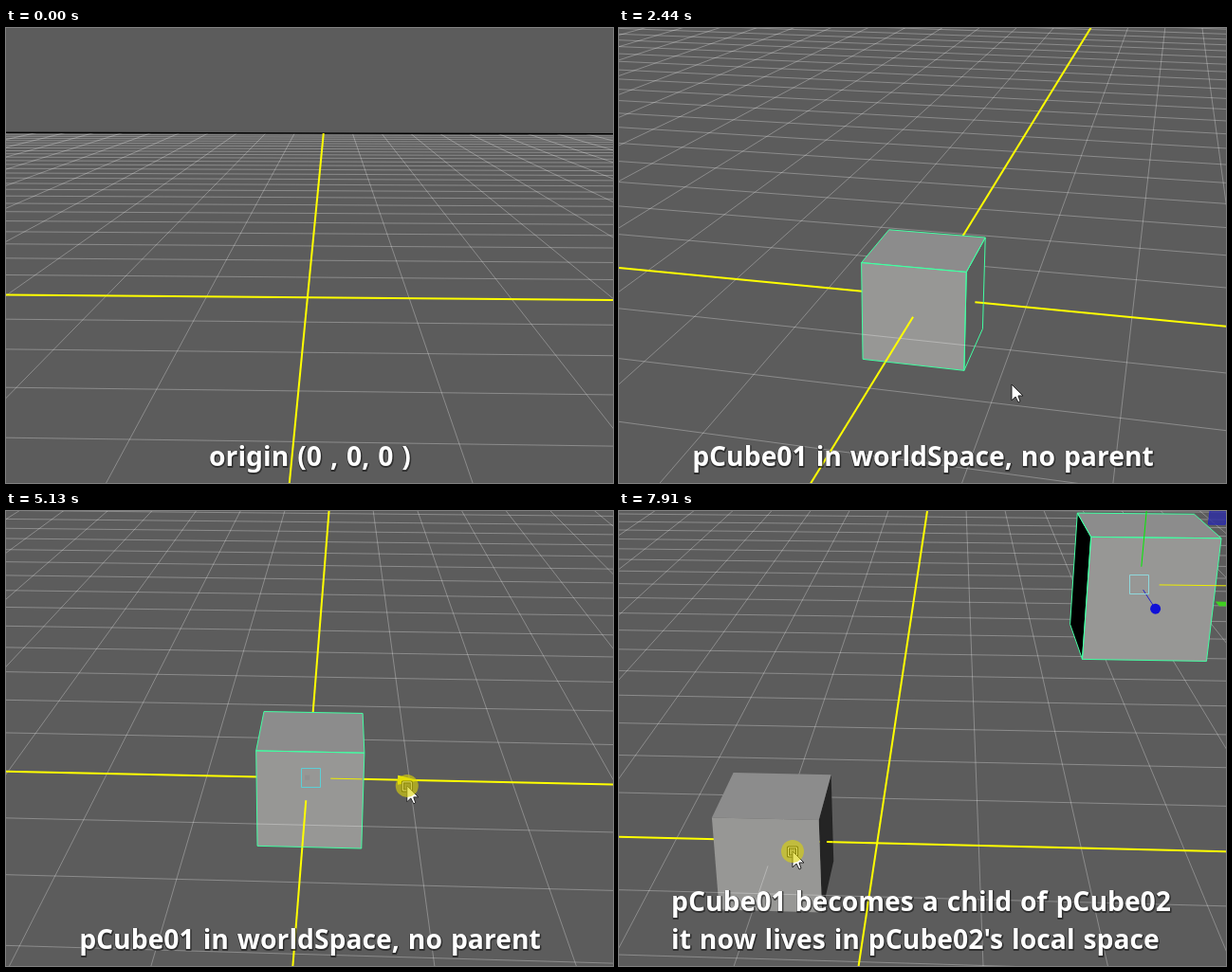
An HTML page with a canvas that plays this animation: 640 px wide and 480 px high, repeating every 8 s.

```html
<!DOCTYPE html>
<html lang="en">
<head>
<meta charset="utf-8">
<title>Object space</title>
<style>
  html, body { margin: 0; width: 100%; height: 100%; overflow: hidden; background: #5c5c5c; }
  canvas { display: block; }
</style>
</head>
<body>
<canvas id="stage" width="640" height="480"></canvas>
<script>
const ctx = document.getElementById('stage').getContext('2d');
const LOOP = 8000, FOCAL = 1090, DISTANCE = 10.2, CENTER_X = 298, CENTER_Y = 240, EXTENT = 26;

// Moments of the story, in ms
const TUMBLE = 170, TUMBLE_END = 1880, CUBE_SHOWN = 2060, TURN = 2440, TURN_END = 3110;
const GIZMO_SHOWN = 3140, DRAG = 3945, DRAG_END = 6600, RELEASE = 6850, SECOND_SCENE = 7680, CLICK = 7860;

const SECOND_CUBE = [2.262, 2.735, 0.396];
const SQUARE = [[-1, -1], [1, -1], [1, 1], [-1, 1]];

// Key points: time, then the values reached at that time
const TILT = [[TUMBLE, 2.25, 10.3], [1500, 16.5, 21.5], [TUMBLE_END, 14.3, 20], [TURN, 14.3, 20], [TURN_END, 2.9, 22.8]];
const SLIDE = [[3960, 0], [4730, 1.47], [5480, -1.13], [5820, 0.54], [6020, 0.53], [6410, -1]];
const POINTER = [[TUMBLE, 470, 230], [1500, 403, 399], [TUMBLE_END, 414, 376], [TURN, 414, 376], [3480, 390, 317], [3650, 390, 317], [DRAG, 418, 286]];
const LEAVE = [[RELEASE, 311, 292], [7030, 396, 312]];
const APPROACH = [[SECOND_SCENE, 215, 345], [CLICK, 183, 359]];

let cam;

const within = (t, from, to) => t >= from && t < to;
const mix = (a, b, k) => a + (b - a) * k;
const ease = k => k * k * (3 - 2 * k);

function track(keys, t) {
  const next = keys.findIndex(key => t < key[0]);
  if (next === 0) return keys[0].slice(1);
  if (next < 0) return keys[keys.length - 1].slice(1);
  const [t0, ...from] = keys[next - 1], [t1, ...to] = keys[next];
  return from.map((v, i) => mix(v, to[i], ease((t - t0) / (t1 - t0))));
}

function setCamera(t) {
  const [yaw, pitch] = track(TILT, t);
  const rad = Math.PI / 180, unit = DISTANCE / FOCAL;
  const [panX, panY] = t >= SECOND_SCENE ? [-46, 68.7] : [0, 0];
  const cp = Math.cos(pitch * rad);
  cam = {
    sy: Math.sin(yaw * rad), cy: Math.cos(yaw * rad),
    sp: Math.sin(pitch * rad), cp,
    right: (19 + 0.4 * yaw + panX) * unit,
    up: -(44.7 * cp + 0.15 * yaw + panY) * unit
  };
}

function view([x, y, z]) {
  const near = x * cam.sy + z * cam.cy;
  return [
    cam.right + x * cam.cy - z * cam.sy,
    cam.up + y * cam.cp - near * cam.sp,
    DISTANCE - near * cam.cp - y * cam.sp
  ];
}

const flatten = ([r, u, d]) => [CENTER_X + FOCAL * r / d, CENTER_Y - FOCAL * u / d];
const project = p => flatten(view(p));

function polygon(points, fill, stroke) {
  ctx.beginPath();
  points.forEach(p => ctx.lineTo(...p));
  ctx.closePath();
  if (fill) {
    ctx.fillStyle = fill;
    ctx.fill();
  }
  if (stroke) {
    ctx.strokeStyle = stroke;
    ctx.lineWidth = 1;
    ctx.stroke();
  }
}

function disc(x, y, radius, fill) {
  ctx.fillStyle = fill;
  ctx.beginPath();
  ctx.arc(x, y, radius, 0, 2 * Math.PI);
  ctx.fill();
}

function line(a, b, color, width = 1) {
  const NEAR = 0.5;
  let [p, q] = [view(a), view(b)].sort((m, n) => n[2] - m[2]);
  if (p[2] < NEAR) return;
  if (q[2] < NEAR) {
    const k = (p[2] - NEAR) / (p[2] - q[2]);
    q = p.map((v, i) => mix(v, q[i], k));
  }
  ctx.strokeStyle = color;
  ctx.lineWidth = width;
  ctx.beginPath();
  ctx.moveTo(...flatten(p));
  ctx.lineTo(...flatten(q));
  ctx.stroke();
}

function grid(x0 = -EXTENT, x1 = EXTENT, z0 = -EXTENT, z1 = EXTENT) {
  const pale = 'rgba(255,255,255,.29)';
  const alongZ = (x, ...style) => x >= x0 && x <= x1 && line([x, 0, z0], [x, 0, z1], ...style);
  const alongX = (z, ...style) => z >= z0 && z <= z1 && line([x0, 0, z], [x1, 0, z], ...style);
  for (let i = 1; i <= EXTENT; i++) {
    for (const n of [-i, i]) {
      alongZ(n, pale);
      alongX(n, pale);
    }
  }
  alongX(-EXTENT, '#000', 1.4);
  alongZ(0, '#ff0', 2);
  alongX(0, '#ff0', 2);
}

// Grid lines lying in front of a face are drawn again over it.
function gridBeyond(axis, side, center) {
  const edge = center[axis] + side / 2;
  if (axis === 2) grid(-EXTENT, EXTENT, edge);
  else if (side > 0) grid(edge);
  else grid(-EXTENT, edge);
}

function faceColor(axis, side) {
  if (axis === 2) return '#979795';
  if (axis === 1) return '#8c8c8c';
  if (side < 0) return '#000';
  const v = Math.round(22 + 280 * cam.sy);
  return `rgb(${v},${v},${v})`;
}

function facePoints(axis, side, center) {
  return SQUARE.map(([u, v]) => {
    const p = [...center];
    p[axis] += side / 2;
    p[(axis + 1) % 3] += side * u / 2;
    p[(axis + 2) % 3] += v / 2;
    return project(p);
  });
}

const facesViewer = ([a, b, c]) =>
  (b[0] - a[0]) * (c[1] - a[1]) < (b[1] - a[1]) * (c[0] - a[0]);

function cube(center, selected) {
  const faces = [];
  for (let axis = 0; axis < 3; axis++) {
    for (const side of [-1, 1]) {
      const points = facePoints(axis, side, center);
      if (facesViewer(points)) faces.push({ axis, side, points });
    }
  }
  faces.forEach(f => polygon(f.points, faceColor(f.axis, f.side)));
  if (selected) faces.forEach(f => polygon(f.points, null, '#43ffa3'));
  faces.filter(f => f.axis !== 1).forEach(f => {
    ctx.save();
    polygon(f.points);
    ctx.clip();
    gridBeyond(f.axis, f.side, center);
    ctx.restore();
  });
}

function cone(base, tip, half, color) {
  const dx = tip[0] - base[0], dy = tip[1] - base[1], n = Math.hypot(dx, dy) || 1;
  const ox = -dy / n * half, oy = dx / n * half;
  polygon([tip, [base[0] + ox, base[1] + oy], [base[0] - ox, base[1] - oy]], color);
}

function gizmo(center, { dragging, axisColor, boxColor, planeColor }) {
  const scale = view(center)[2] / DISTANCE;
  const at = (...p) => p.map((v, i) => center[i] + v * scale);
  const spot = (...p) => project(at(...p));
  const handle = place => SQUARE.map(([u, v]) => spot(...place(0.68 + 0.08 * u, 0.68 + 0.08 * v)));

  if (dragging) {
    const [gx, gy] = project([0, 0, 0]);
    ctx.fillStyle = '#909090';
    ctx.fillRect(gx - 3, gy - 3, 5, 5);
  } else {
    line(at(0, 0.18, 0), at(0, 0.83, 0), '#0e0');
    cone(spot(0, 0.82, 0), spot(0, 1.04, 0), 4.5, '#0e0');
    line(at(0, 0, 0.2), at(0, 0, 0.85), '#2222c8');
    disc(...spot(0, 0, 0.88), 5.5, '#1010d8');
    cone(spot(0, 0, 0.9), spot(0, 0, 1.03), 5, '#1010d8');
    polygon(handle((a, b) => [a, b, 0]), 'rgba(45,45,165,.8)', '#2828b8');
    polygon(handle((a, b) => [a, 0, b]), planeColor);
  }
  line(at(0.19, 0, 0), at(dragging ? 0.5 : 0.85, 0, 0), axisColor);
  cone(spot(0.85, 0, 0), spot(1.06, 0, 0), 5, axisColor);

  const [x, y] = project(center).map(Math.round);
  ctx.strokeStyle = boxColor;
  ctx.lineWidth = 1;
  ctx.strokeRect(x - 10.5, y - 10.5, 20, 20);
}

function pointer(x, y, pressed, boxed) {
  ctx.save();
  ctx.translate(x, y);
  if (boxed) {
    for (const [color, width] of [['#000', 3], ['#fff', 1]]) {
      ctx.strokeStyle = color;
      ctx.lineWidth = width;
      ctx.strokeRect(-4.5, -4, 9, 9);
    }
  }
  polygon([[0, 0], [0, 17], [4, 13], [7, 19], [9, 18], [7, 12], [12, 12]], '#fff', '#222');
  if (pressed) disc(0, 0, 12, 'rgba(220,212,8,.62)');
  ctx.restore();
}

function pointerPosition(t, center) {
  if (t >= SECOND_SCENE) return track(APPROACH, t);
  if (t >= RELEASE) return track(LEAVE, t);
  if (t < DRAG) return track(POINTER, t);
  const [x, y] = project([center[0] + 0.94, 0, 0]);
  return [x, y + mix(2, 9, Math.min(1, (t - DRAG) / (6020 - DRAG)))];
}

function caption(text, x, y, align) {
  ctx.font = 'bold 28.3px "Noto Sans", "Open Sans", sans-serif';
  ctx.wordSpacing = '1.6px';
  ctx.textAlign = align;
  ctx.lineJoin = 'round';
  ctx.strokeStyle = 'rgba(30,30,30,.7)';
  ctx.lineWidth = 2;
  ctx.strokeText(text, x + 0.5, y + 0.5);
  ctx.fillStyle = '#fff';
  ctx.fillText(text, x, y);
}

function draw(t) {
  setCamera(t);
  ctx.fillStyle = '#5c5c5c';
  ctx.fillRect(0, 0, 640, 480);
  grid();

  const second = t >= SECOND_SCENE, dragging = within(t, DRAG, RELEASE);
  const center = [track(SLIDE, t)[0], 0, 0];

  if (t >= CUBE_SHOWN) cube(center, !second);
  if (second) {
    cube(SECOND_CUBE, true);
    gizmo(SECOND_CUBE, { axisColor: '#ee0', boxColor: '#8fd8dc', planeColor: '#3fd020' });
  } else if (t >= GIZMO_SHOWN) {
    gizmo(center, {
      dragging,
      axisColor: dragging ? '#ee0' : '#d80000',
      boxColor: !dragging ? '#ee0' : t < 5640 ? '#5ccfd6' : '#777',
      planeColor: within(t, 3450, 3750) ? '#f2c77c' : '#3fb030'
    });
  }

  if (t >= TUMBLE) {
    const pressed = within(t, TUMBLE, TUMBLE_END) || within(t, TURN + 10, TURN_END) ||
      within(t, DRAG, DRAG_END) || t >= CLICK;
    pointer(...pointerPosition(t, center), pressed, t >= 3400);
  }

  if (second) {
    caption('pCube01 becomes a child of pCube02', 55, 422, 'left');
    caption("it now lives in pCube02's local space", 55, 462, 'left');
  } else {
    caption(t < CUBE_SHOWN ? 'origin (0 , 0, 0 )' : 'pCube01 in worldSpace, no parent', 320.5, 462, 'center');
  }
}

const start = performance.now();
function tick() {
  draw((performance.now() - start) % LOOP);
  requestAnimationFrame(tick);
}
tick();
</script>
</body>
</html>
```
